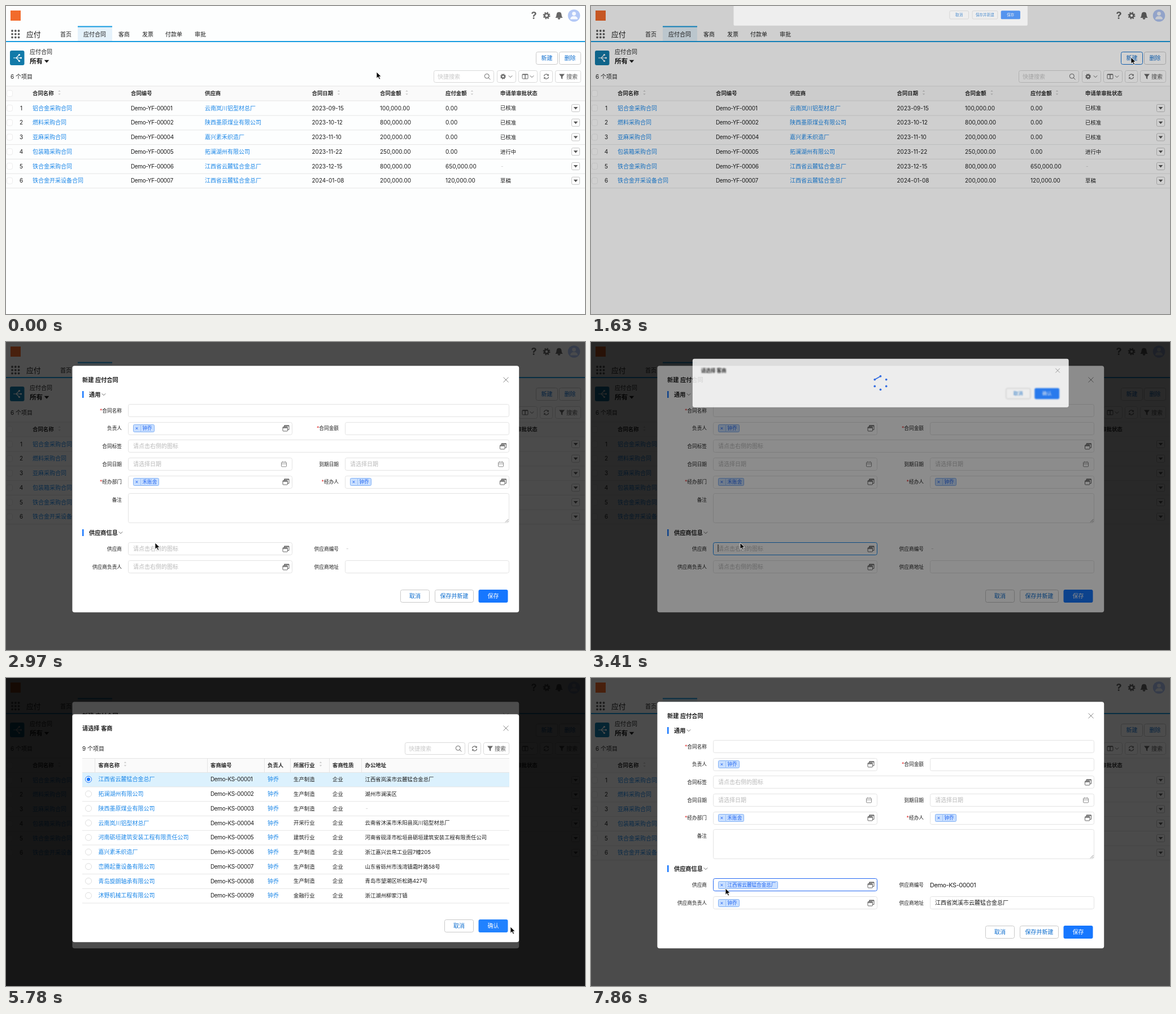
Recreate the animation shown at these times as an HTML page. Size 1025 px wide and 546 px high, loop 8 s.

```html
<!DOCTYPE html>
<html lang="zh-CN">
<head>
<meta charset="utf-8">
<title>应付合同</title>
<style>
html, body { margin: 0; width: 100%; height: 100%; overflow: hidden; background: #fdfefe; }
svg { display: block; width: 1025px; height: 546px; }
text { font-family: Inter, "Noto Sans CJK SC", "Noto Sans CJK", sans-serif; white-space: pre; }
.code { letter-spacing: -.037em; }
.soft { filter: blur(1px); }
</style>
</head>
<body>
<svg id="stage" viewBox="0 0 1025 546"></svg>
<script>
const LOOP = 8000, SHADE = 0.7;
const LINK = '#1b87e8', INK = '#1c1c1c', GREY = '#666', LINE = '#d9d9d9', BLUE = '#1677ff', NAV = '#169be0';

// drawing helpers
const rect = (x, y, w, h, fill, stroke = 'none', r = 0, extra = '') =>
  `<rect x="${x}" y="${y}" width="${w}" height="${h}" rx="${r}" fill="${fill}" stroke="${stroke}" ${extra}/>`;
const box = (x, y, w, h, stroke = LINE, fill = '#fff', r = 3, extra = '') =>
  rect(x + .5, y + .5, w - 1, h - 1, fill, stroke, r, extra);
const text = (x, cy, s, { size = 10, fill = INK, weight = 400, anchor = 'start', cls = '' } = {}) =>
  `<text x="${x}" y="${cy + size * .36}" font-size="${size}" font-weight="${weight}" fill="${fill}" text-anchor="${anchor}" class="${cls}">${s}</text>`;
const path = (d, stroke = GREY, w = 1, fill = 'none', extra = '') =>
  `<path d="${d}" fill="${fill}" stroke="${stroke}" stroke-width="${w}" ${extra}/>`;
const circle = (x, y, r, fill, stroke = 'none', w = 1, extra = '') =>
  `<circle cx="${x}" cy="${y}" r="${r}" fill="${fill}" stroke="${stroke}" stroke-width="${w}" ${extra}/>`;
const group = (id, body, extra = '') => `<g id="${id}" ${extra}>${body}</g>`;
const hline = (x, y, w, c = '#e5e5e5') => rect(x, y, w, 1, c);
const heading = (x, cy, s) => text(x, cy, s, { size: 9.4, weight: 600, fill: '#2a2a2a' });

// icons
const chevron = (x, y, s = 3.2) => path(`M${x - s} ${y - s / 2}l${s} ${s}l${s} ${-s}`, GREY);
const caret = (x, y, s, c) => path(`M${x - s} ${y - s / 2}h${2 * s}l${-s} ${s * 1.15}z`, 'none', 0, c);
const gear = (x, y, k) => circle(x, y, 3.3 * k, 'none', GREY, 2.4 * k) +
  circle(x, y, 5.1 * k, 'none', GREY, 1.8 * k, `stroke-dasharray="${2.1 * k} ${1.905 * k}"`);
const lens = (x, y) => circle(x - .7, y - .7, 4, 'none', GREY) + path(`M${x + 2.2} ${y + 2.2}l3.2 3.2`);
const refresh = (x, y) =>
  path(`M${x - 4} ${y - .5}a4 4 0 0 1 7.4 -1.7M${x + 4} ${y + .5}a4 4 0 0 1 -7.4 1.7`, GREY, 1.2) +
  path(`M${x + 4.3} ${y - 4.6}v3.4h-3.4zM${x - 4.3} ${y + 4.6}v-3.4h3.4z`, 'none', 0, GREY);
const funnel = (x, y) => path(`M${x - 5} ${y - 4.5}h10l-3.8 4.8v4.4l-2.4 -1.4v-3z`, 'none', 0, GREY);
const sorter = (x, y) => caret(x, y + 2.4, 2.2, '#c9c9c9') +
  path(`M${x - 2.2} ${y - 2.2}h4.4l-2.2 -2.5z`, 'none', 0, '#c9c9c9');
const picker = (x, y) => path(`M${x - 3} ${y - 2.5}v-2.5h8.5v7.5h-2.5`, GREY) +
  rect(x - 5.5, y - 2.5, 8.5, 7.5, 'none', GREY, 1) + path(`M${x - 5.5} ${y - 1}h8.5M${x - 3} ${y - 4.4}h8.5`, GREY, 1.6);
const calendar = (x, y) => rect(x - 4.5, y - 3.5, 9, 8, 'none', '#8c8c8c', 1) +
  path(`M${x - 4.5} ${y - .5}h9M${x - 2.2} ${y - 5}v2.6M${x + 2.2} ${y - 5}v2.6`, '#8c8c8c', .9);
const cross = (x, y) => path(`M${x - 4.5} ${y - 4.5}l9 9m0 -9l-9 9`, '#8a8a8a');
const button = (x, y, w, label, id = '') => box(x, y, w, 23, '#c9c9c9', '#fff', 3, id && `id="${id}"`) +
  text(x + w / 2, y + 11.2, label, { fill: '#0b6cce', anchor: 'middle' });
const primary = (x, y, w, label, id = '') => rect(x, y, w, 23, BLUE, 'none', 3, id && `id="${id}"`) +
  text(x + w / 2, y + 11.2, label, { fill: '#fff', anchor: 'middle' });
const searchBox = x => box(x, 114, 107, 22) + text(x + 7, 125, '快捷搜索', { fill: '#c8c8c8' }) + lens(x + 95, 125);
const filterBox = x => box(x, 114, 46, 22) + funnel(x + 12, 125) + text(x + 20, 125, '搜索', { fill: '#555' });
const refreshBox = x => box(x, 114, 23, 22) + refresh(x + 11.5, 125);

// data
const owner = '钟乔', dept = '禾账舍';
const firms = [
  ['江西省云麓锰合金总厂', '生产制造', '江西省岚溪市云麓锰合金总厂'],
  ['拓澜湖州有限公司', '生产制造', '湖州市澜溪区'],
  ['陕西墨原煤业有限公司', '生产制造', ''],
  ['云南岚川铝型材总厂', '开采行业', '云南省沐溪市禾阳县岚川铝型材总厂'],
  ['河南砺垣建筑安装工程有限责任公司', '建筑行业', '河南省砚泽市松垣县砺垣建筑安装工程有限责任公司'],
  ['嘉兴素禾织造厂', '生产制造', '浙江嘉兴云帛工业园7幢205'],
  ['峦腾起重设备有限公司', '生产制造', '山东省砾州市浅湾镇霜叶路58号'],
  ['青岛旋朗轴承有限公司', '生产制造', '青岛市望潮区听松路427号'],
  ['沐野机械工程有限公司', '金融行业', '浙江湖州柳家汀镇']
];
const deals = [
  ['铝合金采购合同', 1, 3, '2023-09-15', '100,000.00', '0.00', '已核准'],
  ['燃料采购合同', 2, 2, '2023-10-12', '800,000.00', '0.00', '已核准'],
  ['亚麻采购合同', 4, 5, '2023-11-10', '200,000.00', '0.00', '已核准'],
  ['包装箱采购合同', 5, 1, '2023-11-22', '250,000.00', '0.00', '进行中'],
  ['铁合金采购合同', 6, 0, '2023-12-15', '800,000.00', '650,000.00', ''],
  ['铁合金开采设备合同', 7, 0, '2024-01-08', '200,000.00', '120,000.00', '草稿']
];
const status = (x, y, s) => s ? text(x, y, s, { size: 9.4 }) : text(x + 1, y, '-', { fill: '#ccc' });

function listPage() {
  let s = rect(0, 0, 1025, 546, '#fdfefe') + rect(8, 8, 18, 18, '#f26b2c');
  s += text(934.5, 17, '?', { size: 18, weight: 700, fill: GREY, anchor: 'middle' }) + gear(957, 17, 1.08);
  s += path('M973 20.5q2 -1.5 2 -5.5a4 4 0 0 1 8 0q0 4 2 5.5zM977 21.5h4a2 2 0 0 1 -4 0z', GREY, .8, GREY);
  s += circle(1005.5, 17, 10.8, '#b3c8f6') + circle(1005.5, 13.6, 3.4, '#f6f9ff') +
    path('M999 23.5q0 -5.5 6.5 -5.5t6.5 5.5z', 'none', 0, '#f6f9ff');
  for (let i = 0; i < 9; i++) s += circle(11 + i % 3 * 5.8, 44 + (i / 3 | 0) * 5.8, 1.9, '#5a5a5a');
  s += text(36, 50, '应付', { size: 12.8 });
  s += rect(127, 36, 61, 27, '#e5f2fb') + rect(127, 35.5, 61, 2, NAV) + rect(0, 62, 1025, 2, NAV);
  [['首页', 96], ['应付合同', 137], ['客商', 199], ['发票', 241], ['付款单', 282], ['审批', 334]]
    .forEach(([n, x]) => s += text(x, 50, n));
  s += rect(7, 79, 25.5, 26, '#127aa9', 'none', 3) +
    path('M13 92h5l5 -5m-5 5l5 5M18 92h8', '#fff', 1.2) +
    circle(23.5, 86.5, 1.6, '#fff') + circle(23.5, 97.5, 1.6, '#fff') + circle(26.5, 92, 1.6, '#fff');
  s += text(42, 81, '应付合同') + text(42, 98, '所有', { size: 11.6, weight: 600 }) + caret(72, 98, 4.3, INK);
  s += button(938, 81, 39, '新建', 'newBtn') + button(979, 81, 39, '删除');
  s += text(8, 125, '6 个项目') + searchBox(757);
  s += box(869, 114, 34, 22) + gear(880, 125, .82) + chevron(893, 125);
  s += box(907, 114, 34, 22) + rect(914, 121, 10, 8, 'none', GREY, 1) +
    path('M914 121.5h10M919 121v8', GREY, 1.4) + chevron(931, 125);
  s += refreshBox(945) + filterBox(972);
  s += rect(0, 142, 1025, 26, '#fafafa') + hline(0, 141.5, 1025) + hline(0, 167.5, 1025);
  const cols = [47, 221, 352, 541.5, 662, 778, 875];
  ['合同名称', '合同编号', '供应商', '合同日期', '合同金额', '应付金额', '申请单审批状态'].forEach((h, i) =>
    s += heading(cols[i], 155, h));
  [94.5, 589, 709.5, 825].forEach(x => s += sorter(x, 154));
  s += box(1, 149, 11, 12, '#ececec');
  deals.forEach((d, i) => {
    const y = 181 + i * 25.75;
    s += box(1, y - 6, 11, 12, '#ececec') + text(27, y, i + 1, { anchor: 'middle' });
    s += text(cols[0], y, d[0], { fill: LINK }) + text(cols[1], y, 'Demo-YF-0000' + d[1], { cls: 'code' });
    s += text(cols[2], y, firms[d[2]][0], { fill: LINK });
    for (let k = 3; k < 6; k++) s += text(cols[k], y, d[k]);
    s += status(cols[6], y, d[6]);
    s += box(1001, y - 7, 15, 14, '#c4c4c4', '#fff', 2) + caret(1008.5, y, 3.8, '#555') + hline(0, y + 12.6, 1025);
  });
  return s;
}

const tag = (x, y, s, w) => box(x, Math.round(y) - 7, w, 14, '#82b1f5', '#c9dfff', 2) +
  text(x + 6.5, y, '×', { size: 9, fill: '#2468f2', anchor: 'middle' }) +
  rect(x + 13, Math.round(y) - 7, 1, 14, '#9cc2f8') + text(x + 16.5, y, s, { size: 8.6, fill: '#2468f2' });
const label = (right, s, y, must) => text(right, y,
  (must ? '<tspan fill="#e02b2b">*</tspan>' : '') + s, { size: 8.7, anchor: 'end' });
const hint = (x, y, s) => text(x, y, s, { fill: '#b8b8b8' });
const section = (y, s, cx) => rect(135, y - 6, 2.5, 12, BLUE) +
  text(147, y, s, { size: 10.2, weight: 600 }) + chevron(cx, y);

function formBody() {
  const L = 216, Rt = 600, half = 291, full = 675, ask = '请点击右侧的图标', edge = '#e3e3e3';
  const [name, who, mark, date, team, firm, contact] = [121.5, 153.2, 184.8, 216.5, 248.2, 366.8, 398.5];
  const field = (x, y, w, id = '') => box(x, Math.round(y - 11.6), w, 23, edge, '#fff', 3, id && `id="${id}"`);
  let s = section(93, '通用', 173) + section(338, '供应商信息', 203);
  [['合同名称', name, 1], ['负责人', who], ['合同标签', mark], ['合同日期', date], ['经办部门', team, 1],
   ['备注', 280], ['供应商', firm], ['供应商负责人', contact]].forEach(a => s += label(205, ...a));
  [['合同金额', who, 1], ['到期日期', date], ['经办人', team, 1], ['供应商编号', firm], ['供应商地址', contact]]
    .forEach(a => s += label(589, ...a));
  s += field(L, name, full) + field(L, mark, full) + hint(225, mark, ask) + picker(880, 185);
  [who, date, team, contact].forEach(y => s += field(L, y, half) + field(Rt, y, half));
  s += field(L, firm, half, 'supplier') + box(L, 268, full, 53, edge) +
    path('M884 319.5l5.5 -5.5m-2.5 5.5l2.5 -2.5', '#777', .8);
  [who, team, firm, contact].forEach(y => s += picker(495.5, Math.round(y)));
  s += picker(880, 248) + hint(225, date, '请选择日期') + hint(609, date, '请选择日期') +
    calendar(492, date) + calendar(876, date) + tag(609, team, owner, 38);
  s += group('rawTags', tag(225, who, 'bd6eb4d7-0eca-4c19-b9f5-30ce6a28bfc4', 200) + tag(225, team, '660b9f4e11fac00646c63615', 144));
  s += group('nameTags', tag(225, who, owner, 38) + tag(225, team, dept, 46));
  s += group('blank', hint(225, firm, ask) + hint(225, contact, ask) + text(602, firm, '-', { fill: '#c4c4c4' }));
  s += group('filled', tag(225, firm, firms[0][0], 106) + tag(225, contact, owner, 38) +
    text(600, firm, 'Demo-KS-00001', { size: 10.9, cls: 'code' }) + text(609, contact, firms[0][2]));
  return s + rect(224.5, 359, 1, 13, INK, 'none', 0, 'id="typeBar"');
}

function pickTable() {
  const x0 = [163.5, 362, 463, 509, 578, 635.5];
  let s = text(135, 125, '9 个项目') + rect(135, 142, 756, 25, '#fafafa') + rect(135, 167, 756, 26, '#dcf1fd', 'none', 0, 'id="chosen"');
  ['客商名称', '客商编号', '负责人', '所属行业', '客商性质', '办公地址'].forEach((h, i) => s += heading(x0[i], 154.5, h));
  [157, 356, 457, 503, 572, 629].forEach(x => s += rect(x, 142, 1, 25, '#e5e5e5'));
  s += sorter(211, 153) + sorter(557, 153) + hline(135, 142, 756) + hline(135, 167, 756);
  firms.forEach(([name, trade, place], i) => {
    const y = 179.7 + i * 25.75;
    s += circle(146, y, 5.5, '#fff', '#dedede') + text(x0[0], y, name, { fill: LINK });
    s += text(x0[1], y, 'Demo-KS-0000' + (i + 1), { cls: 'code' }) + text(x0[2], y, owner, { fill: LINK });
    s += status(x0[3], y, trade) + status(x0[4], y, '企业') + status(x0[5], y, place) + hline(135, y + 12.8, 756);
  });
  return s + group('radioOn', circle(146, 179.7, 5.5, '#fff', BLUE) + circle(146, 179.7, 3.1, BLUE));
}

function waitTable() {
  let s = '';
  [['客商名称', 143], ['客商编号', 291], ['负责人', 411], ['所属行业', 508], ['客商性质', 652], ['办公地址', 772]]
    .forEach(([h, x]) => s += heading(x, 154.5, h));
  return text(135, 125, '个项目') + hline(135, 142, 756) + `<g class="soft">${s}${sorter(191, 153)}${sorter(557, 153)}</g>`;
}

const panel = (id, top, title, body, foot) => group(id,
  rect(117.4, top + .3, 790.8, 102, '#fff', 'none', 4, `id="${id}Back"`) +
  group(id + 'Title', text(135, top + 25, title, { size: 10.2, weight: 600 })) + cross(885, top + 25) +
  body + group(id + 'Foot', foot));

const $ = id => document.getElementById(id);
$('stage').innerHTML = listPage() + rect(0, 0, 1025, 546, '#000', 'none', 0, 'id="shadeA"') +
  panel('form', 42, '新建 应付合同', group('formBody', formBody()),
    button(698, -11, 52, '取消') + button(759, -11, 69, '保存并新建') + primary(836.5, -11, 52, '保存')) +
  rect(0, 0, 1025, 546, '#000', 'none', 0, 'id="shadeB"') +
  panel('pick', 64, '请选择 客商',
    group('tools', searchBox(706) + refreshBox(818) + filterBox(845)) + group('wait', waitTable()) + group('rows', pickTable()),
    button(776, -11, 52, '取消', 'cancelBtn') + primary(836.5, -11, 52, '确认', 'okBtn')) +
  group('cursor', path('M0 0v11.3l2.7 -2.5l2 4.3l1.9 -.9l-2 -4.1h3.6z', '#fff', .8, '#000'));
$('pick').insertAdjacentHTML('beforeend', group('spin', ''));

const show = (id, on) => $(id).style.display = on ? '' : 'none';
const attr = (id, k, v) => $(id).setAttribute(k, v);

// the screen only refreshes at these moments: first, last, count
const bursts = [[150, 150, 1], [750, 1340, 5], [1630, 1780, 2], [2080, 2970, 7], [3260, 4300, 8],
  [4450, 5490, 8], [5640, 5780, 2], [6080, 6220, 2], [6520, 7420, 7], [7570, 7860, 3]];
const ticks = [0];
for (const [a, b, n] of bursts)
  for (let i = 0; i < n; i++) ticks.push(Math.floor((a + (n > 1 ? i * (b - a) / (n - 1) : 0)) / 10) * 10);

// pointer moves: begin, end, x, y
const moves = [[0, 150, 660, 110], [600, 1340, 956, 91], [1780, 2080, 955, 89], [2080, 2970, 264, 356],
  [3410, 4000, 262, 268], [4300, 4750, 200, 178], [4900, 5490, 800, 444], [5490, 5780, 893, 441],
  [5930, 6220, 866, 441], [6670, 7420, 300, 400], [7420, 7860, 238, 373]];
function pointer(t) {
  let x = 656, y = 117;
  for (const [a, b, nx, ny] of moves) {
    if (t < a) break;
    const p = Math.min(1, (t - a) / (b - a)), e = p * p * (3 - 2 * p);
    x += (nx - x) * e;
    y += (ny - y) * e;
  }
  return [x, y];
}

function pose(id, shade, p, top, h) {
  const s = .5 + .5 * p, cy = top + h / 2;
  show(id, p > 0);
  attr(shade, 'opacity', SHADE * p ** 1.15);
  attr(id, 'opacity', s);
  attr(id, 'transform', `translate(512.5 ${cy - 269 * (1 - s)}) scale(${s}) translate(-512.5 ${-cy})`);
  attr(id + 'Back', 'height', h);
  attr(id + 'Foot', 'transform', `translate(0 ${top + h - 29})`);
}

function spinner(cy, n, joined) {
  const at = k => [512.5 + 14 * Math.sin(k * Math.PI / 3), cy - 14 * Math.cos(k * Math.PI / 3)];
  let s = joined ? path(`M${at(5)}L${at(0)}`, '#2468f2', 2) : '';
  for (let k = 0; k < n; k++) s += circle(...at(k), 2.2, '#2468f2');
  $('spin').innerHTML = s;
}

function render(time) {
  const t = ticks.filter(k => k <= time).pop();
  const [x, y] = pointer(t);
  attr('cursor', 'transform', `translate(${x} ${y})`);
  attr('newBtn', 'stroke', t >= 1340 && t < 1780 ? '#1272d3' : '#c9c9c9');

  const formIn = t < 1630 ? 0 : t < 1780 ? .316 : 1;
  pose('form', 'shadeA', formIn, 42, t < 2080 ? 102 : 437);
  show('formBody', t >= 2080);
  show('rawTags', t < 2230);
  show('nameTags', t >= 2230);
  const done = t >= 6810, asking = t >= 3260 && !done;
  show('blank', !done);
  show('filled', done);
  show('typeBar', asking);
  attr('supplier', 'stroke', asking ? '#1a8cf0' : t >= 7570 ? '#2468f2' : '#e3e3e3');

  const pickIn = t < 3400 ? 0 : t < 3550 ? .684 : t < 6660 ? 1 : t < 6810 ? .45 : 0;
  const small = t < 3700, ready = t >= 4140;
  pose('pick', 'shadeB', pickIn, 64, small ? 102 : ready ? 404 : 316);
  for (const id of ['pickTitle', 'pickFoot']) $(id).classList.toggle('soft', small);
  show('tools', !small);
  show('wait', !small && !ready);
  show('rows', ready);
  show('spin', !ready);
  spinner(small ? 115 : 240, small ? 6 : 1 + (Math.round((t - 4000) / 150) + 12) % 6, small);
  const chosen = t >= 4740;
  show('chosen', chosen);
  show('radioOn', chosen);
  attr('cancelBtn', 'stroke', t >= 5490 && t < 5640 ? BLUE : '#c9c9c9');
  attr('okBtn', 'fill', t >= 6080 ? '#4096ff' : t >= 5640 ? '#2182ff' : BLUE);
}

const start = performance.now();
function loop() {
  render((performance.now() - start) % LOOP);
  requestAnimationFrame(loop);
}
loop();
</script>
</body>
</html>
```
